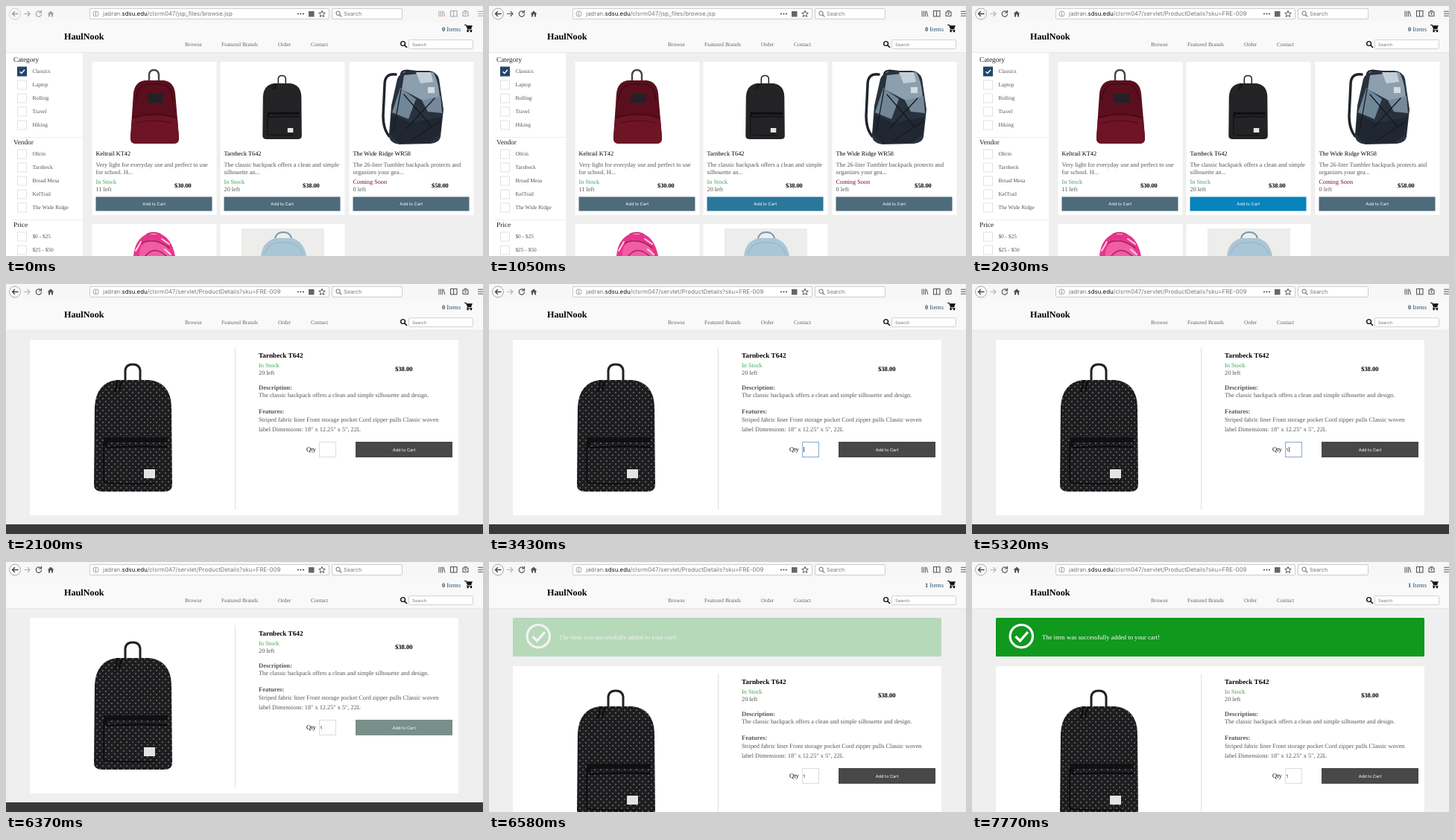
Recreate the animation shown at these times as an HTML page. Size 640 by 336 pixels, loop 7840 ms.

```html
<!DOCTYPE html>
<html lang="en">
<head>
<meta charset="utf-8">
<title>Backpack shop</title>
<style>
  html, body { margin: 0; width: 100%; height: 100%; overflow: hidden; background: #efefef; }
  svg { display: block; }
  text { font-family: "Liberation Serif", "Times New Roman", serif; font-size: 8.25px; fill: #555; text-rendering: geometricPrecision; white-space: pre; }
  .ui { font-family: Inter, sans-serif; font-size: 7.9px; fill: #777; }
  .btn { font-family: Inter, sans-serif; font-size: 5.7px; fill: #fff; text-anchor: middle; }
  .small { font-family: Inter, sans-serif; font-size: 5.8px; }
  .nav { font-size: 7.45px; fill: #666; }
  .head { font-size: 9.3px; fill: #222; }
  .b { font-weight: bold; }
  .black { fill: #000; }
  .stock { fill: #3fa85c; }
  .soon { fill: #7d0f24; }
  .line { fill: none; stroke: #555; stroke-width: 1.1; }
</style>
</head>
<body>
<svg id="stage" width="640" height="336" viewBox="0 0 640 336"></svg>
<script>
const LOOP = 7840;
const SITE = 'jadran.<tspan fill="#111">sdsu.edu</tspan>/clsrm047/';
const URLS = [SITE + 'jsp_files/browse.jsp', SITE + 'servlet/ProductDetails?sku=FRE-009'];

const text = (x, y, s, cls = '', extra = '') => `<text x="${x}" y="${y}" class="${cls}" ${extra}>${s}</text>`;
const rect = (x, y, w, h, fill, extra = '') => `<rect x="${x}" y="${y}" width="${w}" height="${h}" fill="${fill}" ${extra}/>`;
const path = (d, fill, extra = '') => `<path d="${d}" fill="${fill}" ${extra}/>`;
const line = (d, color, width = 1) => path(d, 'none', `stroke="${color}" stroke-width="${width}" stroke-linecap="round"`);
const ring = (x, y, r, color, width) => `<circle cx="${x}" cy="${y}" r="${r}" fill="none" stroke="${color}" stroke-width="${width}"/>`;

const BODY = 'M118 270L119 165Q121 133 148 129H193Q221 133 222 165L223 270Q223 279 212 279H130Q118 279 118 270Z';
const defs = `<defs>
  <pattern id="dots" width="8" height="8" patternUnits="userSpaceOnUse">
    <circle cx="2" cy="2" r=".75" fill="#b5b3ad"/><circle cx="6" cy="6" r=".75" fill="#b5b3ad"/>
  </pattern>
  <g id="blackBag">
    ${line('M160 130V116Q161 108 170 108Q179 108 180 116V130', '#222', 3)}
    ${path(BODY, '#1d1d20')}${path(BODY, 'url(#dots)')}
    ${path('M131 206H217V213H136V219H131Z', '#101012')}
    ${line('M136 220Q170 217 216 219', '#08080a', 2)}
    ${line('M131 214V266Q150 270 200 268', '#0b0b0d', 1.6)}
    ${line('M150 130L146 145M155 131L152 143', '#0b0b0d', 2)}
    ${rect(185, 249, 15, 12, '#e4e4e2')}
  </g>
</defs>`;

const redBag = line('M192 102V92Q193 86 198.5 86Q204 86 205 92V102', '#4a4146', 2.4)
  + path('M167 176L171 117Q173 102 186 100H212Q225 102 227 117L232 176Q233 185 225 185H174Q166 185 167 176Z', '#5b0f1e')
  + path('M169 152Q199 142 230 152L232 177Q232 185 224 185H175Q167 185 167 177Z', '#6d1425')
  + line('M174 126Q176 107 190 105H209Q222 107 224 126M170 150Q199 141 229 150', '#38070f', 1.2)
  + line('M176 157Q199 151 223 157', '#4a0b18', 1.2)
  + rect(190, 118, 21, 12, '#242126');

const blueBag = line('M523 92Q508 90 508 106L506 148Q506 165 514 175', '#20252d', 3.5)
  + line('M530 92Q531 86 540 87L549 88', '#20252d', 2.5)
  + path('M514 172L517 134L525 98Q529 88 543 87H567Q578 88 581 98L587 139L583 176Q581 184 570 185L528 186Q513 184 514 172Z', '#29313d')
  + path('M534 93L573 89Q580 99 582 123L561 128L531 112Z', '#8c9fae')
  + path('M550 89H570L573 102L556 104Z', '#c3ced6')
  + path('M529 110L550 125L540 152L518 143Z', '#718699')
  + path('M558 127L583 121L585 144L566 142Z', '#75899a')
  + path('M517 146L543 157L585 149L582 172L567 184L528 185L515 172Z', '#202731')
  + line('M534 119L571 162M575 124L537 165M543 181L582 155M530 112L520 168', '#141922', 1.3)
  + rect(566, 109, 9, 8, '#d5dbe0');

const pinkBag = line('M187 311Q188 305 198 305Q208 305 210 311', '#d42f80', 2.5)
  + path('M171 336Q173 314 188 307H208Q222 312 227 336Z', '#e8358c')
  + path('M179 336Q178 319 194 314Q216 317 222 336Z', '#f25ca5')
  + line('M181 319Q199 310 219 325M187 336Q199 321 215 336', '#9d2862', 1.6)
  + line('M174 329L181 317M209 313L219 320M213 327L221 334', '#fbd0e3', 2);

const skyBag = rect(316, 299, 111, 37, '#ededeb')
  + line('M361 312Q363 304 372 304Q381 304 383 312', '#7897ab', 2)
  + path('M342 336Q344 317 361 312H384Q400 317 403 336Z', '#a9c6d6')
  + line('M347 333Q351 319 366 318H379Q394 320 398 333', '#93b2c5');

const toolbarIcons = ring(12, 10.5, 7.5, '#aaa', 1)
  + line('M16 10.5H8.5M11.5 7.5L8.5 10.5L11.5 13.5', '#444', 1.3)
  + '<g id="forward">' + line('M24.5 10.5H32M29 7.5L32 10.5L29 13.5', 'currentColor', 1.2) + '</g>'
  + line('M47 8.5A3.7 3.7 0 1 0 47.6 11M47.5 6V9H44.5', '#555', 1.2)
  + path('M55.5 10.5L60 6.5L64.5 10.5H63V14.5H61V11.5H59V14.5H57V10.5Z', '#555')
  + line('M581 7V14M583.3 7V14M585.6 7V14M587 7.3L588.8 14', '#555', 1)
  + path('M596.5 6.5H605V14H596.5ZM600.5 6.5V14', 'none', 'class="line"')
  + path('M613 8V13.5H620V8ZM614.5 6.5H618.5', 'none', 'class="line"') + rect(615.5, 9.5, 2, 2, '#555')
  + line('M633.5 7.3H639.5M633.5 10.3H639.5M633.5 13.3H639.5', '#555', 1.1);

const chrome = rect(0, 0, 640, 21, '#f7f7f8') + `<g id="icons">${toolbarIcons}</g>`
  + rect(112.5, 3.5, 321, 14, '#fff', 'stroke="#ccc" rx="1.5"')
  + ring(120.5, 10.5, 3.6, '#888', .8) + line('M120.5 10V12.3M120.5 8.4V8.5', '#777', .9)
  + text(130, 13.3, '', 'ui', 'id="url"')
  + [392, 395.5, 399].map(x => `<circle cx="${x}" cy="10.5" r="1.1" fill="#555"/>`).join('')
  + rect(406, 7, 7.5, 7.5, '#666')
  + path('M424 6.3L425.2 9.2L428.3 9.4L425.9 11.4L426.7 14.5L424 12.8L421.3 14.5L422.1 11.4L419.7 9.4L422.8 9.2Z', 'none', 'stroke="#555"')
  + rect(437.5, 3.5, 94, 14, '#fff', 'stroke="#ccc" rx="1.5"')
  + ring(445.6, 9.8, 2.7, '#666', 1) + line('M447.7 11.9L450 14.2', '#666', 1.1)
  + text(453, 13.3, 'Search', 'ui', 'style="font-size:7.3px"');

const header = rect(0, 21, 640, 41, '#f9f9f9') + rect(0, 62, 640, 1, '#e6e6e6')
  + text(78, 45, 'HaulNook', 'b black', 'style="font-size:12.2px"')
  + text(240, 54, 'Browse', 'nav') + text(289, 54, 'Featured Brands', 'nav')
  + text(365, 54, 'Order', 'nav') + text(409, 54, 'Contact', 'nav')
  + `<text x="585" y="33.7" style="font-size:8.4px;fill:#2a5272"><tspan id="count" class="b">0</tspan> Items</text>`
  + line('M615.5 25.5H617.3L619.5 30.5H624', '#111', 1.2)
  + path('M618 26.3H626L623.8 31H620Z', '#111')
  + '<circle cx="619.6" cy="34" r="1.2"/><circle cx="624" cy="34" r="1.2"/>' + line('M619.5 31L618.6 32.3H625', '#111', 1)
  + ring(532.6, 50.5, 2.9, '#111', 1.4) + line('M534.8 52.7L537.6 55.5', '#111', 1.6)
  + rect(540.5, 45.5, 86, 12, '#fff', 'stroke="#d2d2d2" rx="1"')
  + text(545, 54, 'Search', 'small', 'style="fill:#777"');

function filterGroup(title, y, names) {
  return text(10, y, title, 'head') + names.map((name, i) => {
    const row = y + 13.5 + i * 18, on = name === 'Classics';
    return rect(15.5, row - 6.5, 12, 12, on ? '#21466c' : '#fff', `stroke="${on ? '#21466c' : '#e2e2e2'}"`)
      + (on ? path(`M18.5 ${row - .3}L20.8 ${row + 2}L25 ${row - 2.7}`, 'none', 'stroke="#fff" stroke-width="1.5"') : '')
      + text(35.4, row + 1.8, name, '', 'style="font-size:7.4px"');
  }).join('');
}

const sidebar = rect(0, 63, 103, 273, '#fff')
  + rect(8, 176, 95, 1, '#efefef') + rect(8, 287, 95, 1, '#efefef')
  + filterGroup('Category', 75, ['Classics', 'Laptop', 'Rolling', 'Travel', 'Hiking'])
  + filterGroup('Vendor', 186, ['Oltrin', 'Tarnbeck', 'Broad Mesa', 'KelTrail', 'The Wide Ridge'])
  + filterGroup('Price', 297, ['$0 - $25', '$25 - $50']);

function card(x, picture, name, desc, price, left, soon) {
  const tx = x + 5.5;
  return rect(x + .5, 75, 167, 206, '#fff') + picture
    + text(tx, 201, name, 'black') + text(tx, 215.5, desc[0]) + text(tx, 226, desc[1])
    + text(tx, 239.2, soon ? 'Coming Soon' : 'In Stock', soon ? 'soon' : 'stock')
    + text(tx, 249, left + ' left') + text(x + 111, 244.2, price, 'b black')
    + rect(tx, 256.5, 156, 19, '#4d6b7a', 'class="add"')
    + text(x + 83.7, 268.2, 'Add to Cart', 'btn');
}

const browse = '<g id="browse">' + sidebar
  + card(115, redBag, 'Keltrail KT42', ['Very light for everyday use and perfect to use', 'for school. H...'], '$30.00', 11)
  + card(287, '<use href="#blackBag" transform="translate(285.3 39.5) scale(.5)"/>', 'Tarnbeck T642',
    ['The classic backpack offers a clean and simple', 'silhouette an...'], '$38.00', 20)
  + card(460, blueBag, 'The Wide Ridge WR58', ['The 26-liter Tumbler backpack protects and', 'organizes your gea...'], '$58.00', 0, true)
  + rect(115.5, 293, 167, 43, '#fff') + rect(287.5, 293, 167, 43, '#fff') + pinkBag + skyBag + '</g>';

const details = '<g id="details"><g id="product">'
  + rect(32, 75, 575, 236, '#fff', 'rx="1.5"') + rect(307, 85, 1, 218, '#e0e0e0') + '<use href="#blackBag"/>'
  + text(339, 98.5, 'Tarnbeck T642', 'b black', 'style="font-size:9.2px"')
  + text(339, 111.7, 'In Stock', 'stock') + text(339, 121.5, '20 left')
  + text(522, 116.5, '$38.00', 'b black', 'style="font-size:8.6px"')
  + text(339, 141.5, 'Description:', 'b', 'style="font-size:8.5px"')
  + text(339, 152, 'The classic backpack offers a clean and simple silhouette and design.')
  + text(339, 173.5, 'Features:', 'b', 'style="font-size:8.5px"')
  + text(339, 184.7, 'Striped fabric liner Front storage pocket Cord zipper pulls Classic woven')
  + text(339, 197.7, 'label Dimensions: 18" x 12.25" x 5", 22L')
  + text(403, 225, 'Qty', 'black', 'style="font-size:8.6px"')
  + rect(420.5, 212.5, 22, 20, '#fff', 'id="qty"') + text(421.5, 224.8, '1', 'small black', 'id="typed"')
  + rect(422, 219, .8, 7, '#222', 'id="caret"')
  + rect(469, 212, 130, 21, '#484848', 'id="buy"') + text(534, 224.8, 'Add to Cart', 'btn')
  + '</g>' + rect(0, 323, 640, 13, '#393939', 'id="footer"')
  + '<g id="banner">' + rect(32, 75, 575, 52, '#0f991d', 'rx="1.5"') + ring(66.3, 99.7, 15.2, '#fff', 3.2)
  + path('M58.5 100L64.5 106L75 94', 'none', 'stroke="#fff" stroke-width="3.4"')
  + text(94, 103.5, 'The item was successfully added to your cart!', '', 'style="font-size:8.6px;fill:#fff"')
  + '</g></g>';

const $ = id => document.getElementById(id);
$('stage').innerHTML = defs + rect(0, 0, 640, 336, '#efefef') + browse + details + header + chrome;
const hoverButton = document.querySelectorAll('.add')[1];

const show = (el, on) => el.setAttribute('display', on ? 'inline' : 'none');
const ramp = (t, from, to) => Math.min(1, Math.max(0, (t - from) / (to - from)));
const mix = (a, b, p) => `rgb(${a.map((v, i) => Math.round(v + (b[i] - v) * p))})`;

function draw(t) {
  const active = t >= 70, visited = t >= 1820, onDetails = t >= 2100, added = t >= 6510;
  const typed = t >= 4200, focused = t >= 3430 && t < 6160;
  show($('browse'), !onDetails);
  show($('details'), onDetails);
  $('url').innerHTML = URLS[+visited];
  $('icons').setAttribute('opacity', active ? 1 : .5);
  $('forward').style.color = visited ? '#b5b5b5' : '#555';
  hoverButton.setAttribute('fill', mix([77, 107, 122], [8, 131, 188], ramp(t, 910, 1190)));

  $('qty').setAttribute('stroke', focused ? '#86a9cf' : '#ddd');
  show($('typed'), typed);
  const blink = Math.floor((t - (typed ? 4200 : 3430)) / 545) % 2 === 0;
  show($('caret'), focused && blink);
  $('caret').setAttribute('x', typed ? 425.3 : 422);
  $('buy').setAttribute('fill', added ? '#484848' : mix([72, 72, 72], [120, 144, 137], ramp(t, 5740, 5950)));

  $('product').setAttribute('transform', `translate(0 ${added ? 65 : 0})`);
  show($('footer'), !added);
  $('banner').setAttribute('opacity', ramp(t, 6440, 7000) * added);
  $('count').textContent = added ? 1 : 0;
}

const start = performance.now();
function tick() {
  draw((performance.now() - start) % LOOP);
  requestAnimationFrame(tick);
}
tick();
</script>
</body>
</html>
```
